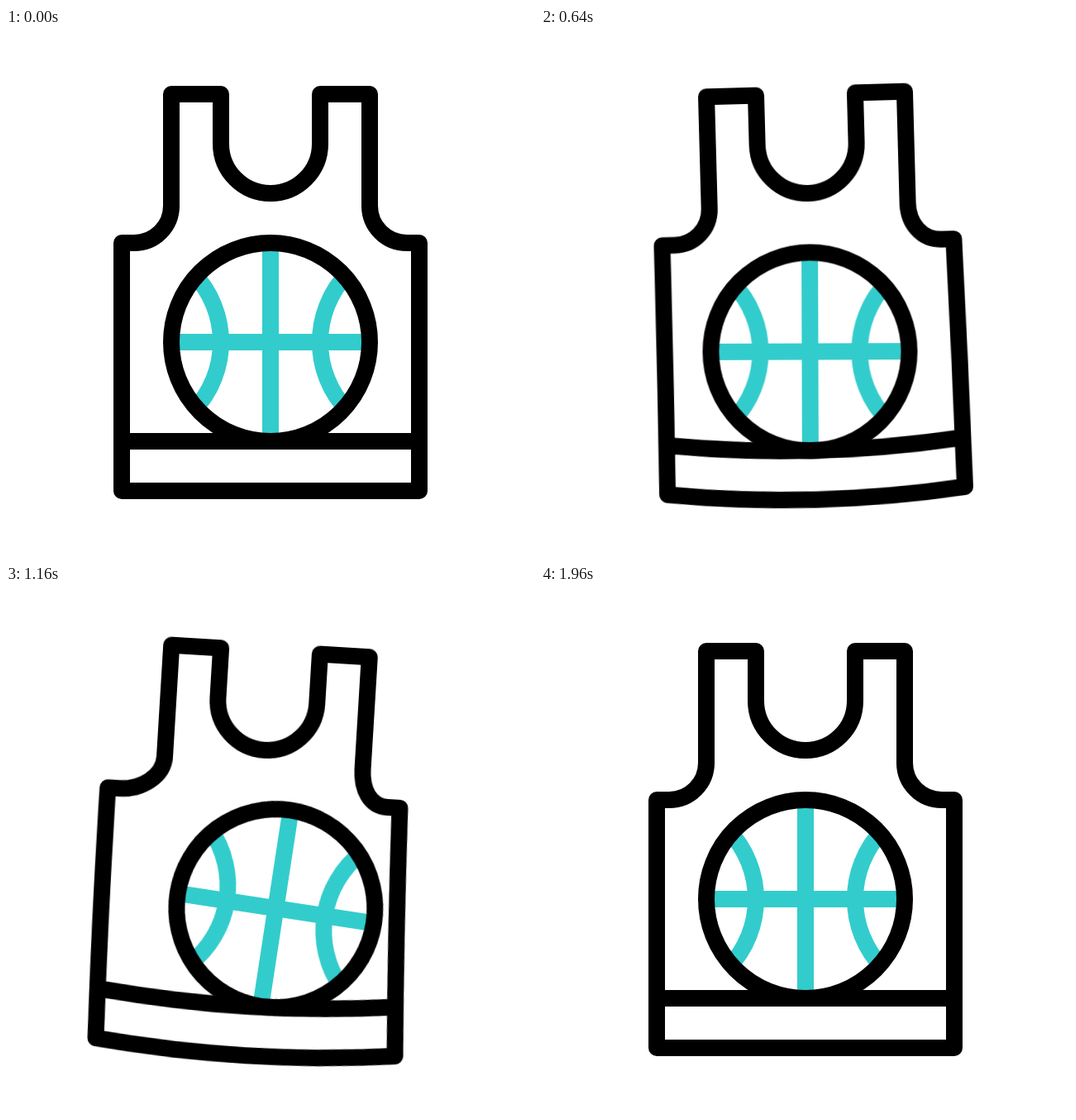
An HTML page that plays this animation: 640 by 640 pixels, repeating every 2 s.

```html
<!DOCTYPE html>
<html lang="en">
<head>
<meta charset="utf-8">
<title>Swinging basketball jersey</title>
<style>
  html, body { margin: 0; height: 100%; overflow: hidden; background: #fff; }
  svg { display: block; width: 100vw; height: 100vh; fill: none; stroke-width: 20; }

  .ink { stroke: #000; stroke-linecap: round; stroke-linejoin: round; }
  .seams { stroke: #3cc; }

  .jersey, .body, .ball {
    animation: 2s cubic-bezier(.333, 0, .667, 1) infinite;
  }
  .jersey { transform-origin: 320px 80px; animation-name: swing; }
  .body { animation-name: sag; }
  .ball { transform-origin: 320px 380px; animation-name: roll; }

  @keyframes swing {
    0%, 4%, 98%, 100% { transform: rotate(0deg); }
    22% { transform: rotate(6deg); }
    42% { transform: rotate(-9deg); }
    62.5% { transform: rotate(5.2deg); }
    78.75% { transform: rotate(-3deg); }
  }

  @keyframes roll {
    0%, 4%, 98%, 100% { transform: translate(0px, 0px) rotate(0deg); }
    22% { transform: translate(7px, 10.7px) rotate(24deg); }
    42% { transform: translate(4px, 12.3px) rotate(-24deg); }
    62.5% { transform: translate(6.7px, 11px) rotate(13.2deg); }
    78.75% { transform: translate(3px, 4.6px) rotate(-6.3deg); }
  }

  /* Armholes, sides and hem bend while the straps stay stiff */
  @keyframes sag {
    0%, 4%, 98%, 100% {
      d: path("M200 215C200 240 180 260 155 260L140 260Q140 409 140 560Q320 560 500 560Q500 409 500 260L485 260C460 260 440 240 440 215M146 500Q320 500 494 500");
    }
    22% {
      d: path("M200 215C200 240 174 258 149 258L134 258Q134 409 140 560Q320 580 500 560Q491.5 409 489 260L474 260C452 260 440 240 440 215M146 501Q320 520 494 501");
    }
    42% {
      d: path("M200 215C200 240 187 259 164 259L149 259Q149.5 409 140 560Q320 583 500 560Q505 409 500 260L485 260C460 260 440 240 440 215M146 501Q320 523 494 501");
    }
    62.5% {
      d: path("M200 215C200 240 171 256.5 146.5 256.5L131.5 256.5Q131 409 137 560Q320 580 500 560Q490 409 486 260L471 260C450 260 440 240 440 215M146 501Q320 520 494 501");
    }
    78.75% {
      d: path("M200 215C200 240 184 257 161 257L146 257Q146 409 140 560Q320 568 500 560Q504 409 501.5 260L486.5 260C461 260 440 240 440 215M146 500Q320 508 494 500");
    }
  }
</style>
</head>
<body>
<svg viewBox="0 0 640 640">
  <clipPath id="inside"><circle cx="320" cy="380" r="116"/></clipPath>

  <g class="ball">
    <g class="seams" clip-path="url(#inside)">
      <path d="M320 260V500M200 380H440"/>
      <circle cx="140" cy="380" r="120"/>
      <circle cx="500" cy="380" r="120"/>
    </g>
    <circle class="ink" cx="320" cy="380" r="120"/>
  </g>

  <g class="jersey ink">
    <path d="M200 215V80H260V140A60 60 0 0 0 380 140V80H440V215"/>
    <path class="body" d="M200 215C200 240 180 260 155 260L140 260Q140 409 140 560Q320 560 500 560Q500 409 500 260L485 260C460 260 440 240 440 215M146 500Q320 500 494 500"/>
  </g>
</svg>
</body>
</html>
```
